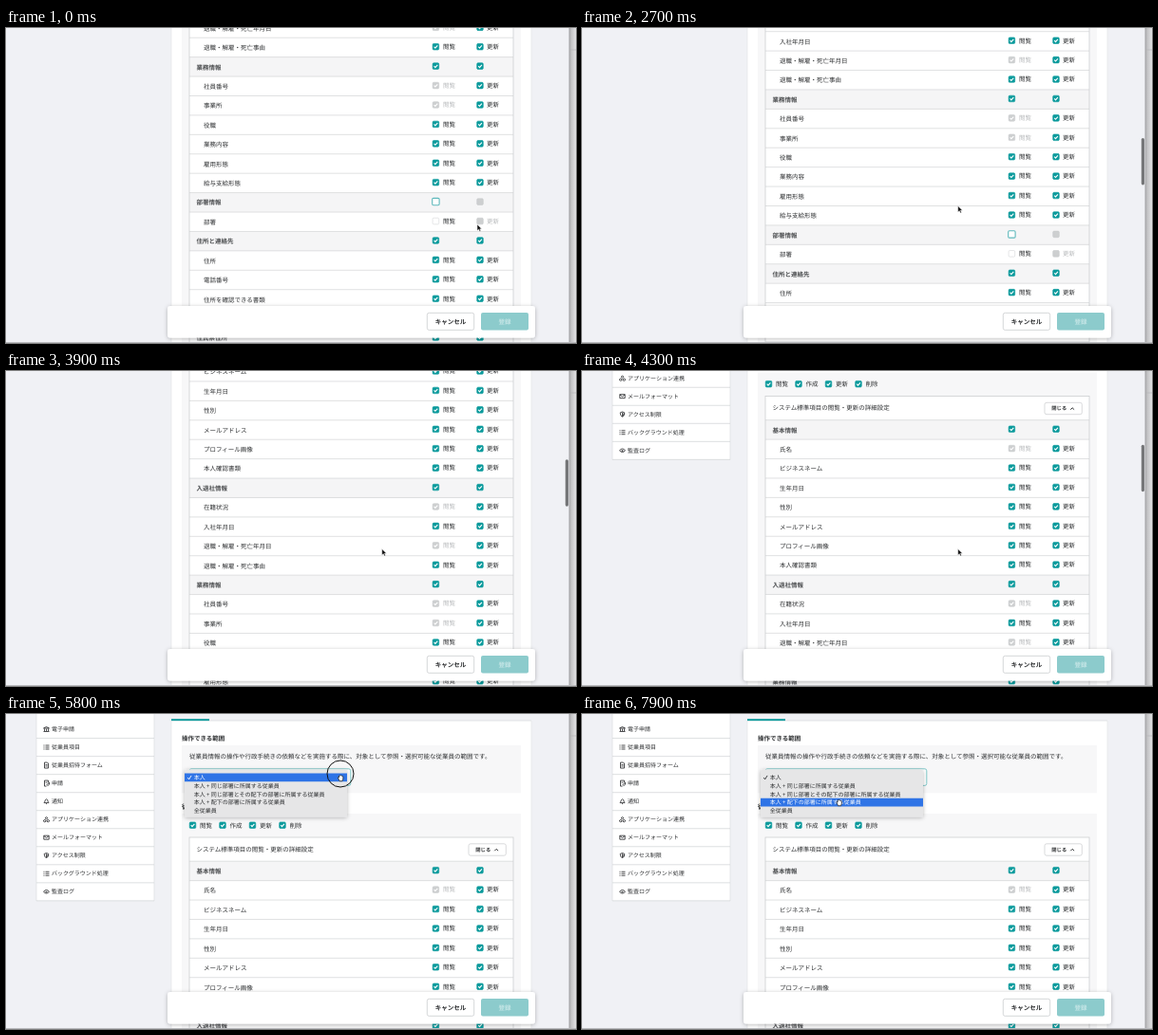
An HTML page for the animation above (8000 ms loop, 600x332 px).

```html
<!DOCTYPE html>
<html lang="ja">
<head>
<meta charset="utf-8">
<style>
html, body { margin: 0; width: 100%; height: 100%; overflow: hidden; background: #f0f1f5; }
svg { display: block; width: 600px; height: 332px; }
text { font-family: "Noto Sans CJK JP", "Noto Sans CJK", "Noto Sans", sans-serif; text-rendering: geometricPrecision; white-space: pre; }
</style>
</head>
<body>
<svg viewBox="0 0 600 332">
  <defs>
    <filter id="soft" x="-10%" y="-40%" width="120%" height="190%">
      <feDropShadow dx="0" dy="1" stdDeviation="2.2" flood-opacity=".28"/>
    </filter>
    <linearGradient id="edge">
      <stop offset="0" stop-color="#b4b4b6"/><stop offset="1" stop-color="#e2e2e4"/>
    </linearGradient>
  </defs>
  <rect width="600" height="332" fill="#f0f1f5"/>
  <g id="page"></g>
  <rect id="thumb" x="588.8" width="3.2" height="49.5" rx="1.6" fill="#757678"/>
  <g id="footer"></g>
  <g id="frame"></g>
  <g id="menu"></g>
  <circle id="ring" cx="352" cy="63" r="14" fill="none" stroke="#111" stroke-width="1"/>
  <path id="arrow" d="M0 0V6.6L1.6 5.2 2.6 7.6 3.8 7.1 2.8 4.8H4.8Z" fill="#111" stroke="#fff" stroke-width=".5"/>
  <path id="hand" d="M-2.2 .3Q-3 -.8 -2 -1L-1.4 -.4V-2.6Q-1 -3.4 -.4 -2.6 .3 -3.3 .8 -2.5 1.6 -2.9 1.9 -2 2.8 -2.2 2.8 -1.2V.8L2.1 3.2H-1Z" fill="#fff" stroke="#222" stroke-width=".75"/>
</svg>
<script>
const $ = id => document.getElementById(id);
const TEAL = '#0b9a9c', INK = '#2d2f31', PITCH = 20.42, TOP = 155.2;

const rect = (x, y, w, h, fill, more = '') =>
  `<rect x="${x}" y="${y}" width="${w}" height="${h}" fill="${fill}" ${more}/>`;
const line = (d, stroke, width = .7) =>
  `<path d="${d}" fill="none" stroke="${stroke}" stroke-width="${width}"/>`;
const text = (x, y, s, size = 6.5, fill = INK, weight = 500, more = '') =>
  `<text x="${x}" y="${y + size * .36}" font-size="${size}" fill="${fill}" font-weight="${weight}" ${more}>${s}</text>`;
const mid = 'text-anchor="middle"';

// Checkbox centred on x, y
function box(x, y, kind = 'on') {
  const [fill, border] = {
    on: [TEAL, TEAL], locked: ['#cdcfd0', '#cdcfd0'], off: ['#fff', '#d4d6d7'],
    focus: ['#fff', '#5fb9bc'], blank: ['#cdcfd0', '#c8cacb']
  }[kind];
  const r = kind === 'focus' ? 3.7 : 3.3;
  const tick = kind === 'on' || kind === 'locked';
  return rect(x - r, y - r, r * 2, r * 2, fill, `rx="1.2" stroke="${border}" stroke-width="${kind === 'focus' ? 1.1 : .6}"`) +
    (tick ? line(`M${x - 1.8} ${y}l1.3 1.4 2.4-2.7`, '#fff', 1.1) : '');
}

// '#' marks a group heading, '-' a locked view permission, '!' an unchecked row
const rows = ['#基本情報', '-氏名', 'ビジネスネーム', '生年月日', '性別', 'メールアドレス', 'プロフィール画像',
  '本人確認書類', '#入退社情報', '-在籍状況', '入社年月日', '-退職・解雇・死亡年月日', '退職・解雇・死亡事由',
  '#業務情報', '-社員番号', '-事業所', '役職', '業務内容', '雇用形態', '給与支給形態', '#!部署情報', '!部署',
  '#住所と連絡先', '住所', '電話番号', '住所を確認できる書類', '緊急連絡先', '#住民票住所', '住所'];

function row(label, i) {
  const y = TOP + PITCH * i, c = y + PITCH / 2, cy = c - .7;
  const group = label.includes('#'), off = label.includes('!'), locked = label.includes('-');
  const view = off ? (group ? 'focus' : 'off') : locked ? 'locked' : 'on';
  return (group ? rect(193, y, 341, PITCH, '#f5f5f6') : '') +
    line(`M193 ${y}H534`, '#d3d4d6') +
    text(group ? 200.5 : 208, c + .3, label.replace(/[#!-]/g, ''), 6.5, group ? '#4c4e50' : INK, group ? 700 : 500) +
    box(452.4, cy, view) + box(499, cy, off ? 'blank' : 'on') +
    (group ? '' : text(460, cy, '閲覧', 6.5, locked ? '#b9bbbd' : INK) +
      text(506, cy, '更新', 6.5, off ? '#b9bbbd' : INK));
}

// Side menu: label and a small icon path in a 6 by 6 box
const list = 'M0 1H1M2 1H6M0 3H1M2 3H6M0 5H1M2 5H6';
const links = [
  ['電子申請', 'M0 2L3 .5 6 2ZM1 2.5V5M3 2.5V5M5 2.5V5M0 5.5H6'],
  ['従業員項目', list],
  ['従業員招待フォーム', 'M1 0H4L5 1V6H1ZM2 2.5H4M2 4H4'],
  ['申請', 'M1 0H5V2M1 0V6H3M2 2H4M3 5L6 2V4L4 6'],
  ['通知', 'M.5 4.5L1.5 3V2Q3-.8 4.5 2V3L5.5 4.5ZM2.5 5.5H3.5'],
  ['アプリケーション連携', 'M2 1L3 .5 4 1V2L3 2.5 2 2ZM0 4L1.3 3.3 2.5 4V5L1.3 5.7 0 5ZM3.5 4L4.7 3.3 6 4V5L4.7 5.7 3.5 5Z'],
  ['メールフォーマット', 'M.3 1H5.7V5H.3ZM.3 1.3L3 3.3 5.7 1.3'],
  ['アクセス制限', 'M3 .3L5.3 1.2Q5.3 4.5 3 5.7 .7 4.5 .7 1.2ZM3 1V5L4.4 3.4V1.8'],
  ['バックグラウンド処理', list],
  ['監査ログ', 'M0 3Q3-.6 6 3 3 6.6 0 3ZM2.4 3H3.6V3.6H2.4Z']
];
const side = links.map(([label, icon], i) => {
  const y = 16 + 19.03 * i;
  return line(`M32 ${y + 9.6}H156`, '#cfd1d4') +
    `<g transform="translate(39.5 ${y - 3})">${line(icon, INK, .85)}</g>` + text(48, y, label, 6);
}).join('');

const tableEnd = TOP + PITCH * rows.length;
$('page').innerHTML =
  rect(32, -60, 124, 256.9, '#fff') + line('M32 -60V197M156 -60V197', '#dcdee1') + side +
  rect(174, 7, 379, 800, '#fff') + line('M174 7H553', '#d5d7da') + line('M174 7V800M553 7V800', '#e4e5e9') +
  rect(174, 5.2, 40, 1.9, TEAL) +
  text(178, -3, '基本設定', 6.5, TEAL, 700) + text(224, -3, 'メンバー管理・手続き・通知設定・書類・その他の項目', 6.5, '#55585a') +
  text(185, 25.6, '操作できる範囲', 6.5, INK, 700) +
  rect(185, 33, 357, 50.3, '#f7f7f8') +
  text(193, 44.8, '従業員情報の操作や行政手続きの依頼などを実施する際に、対象として参照・選択可能な従業員の範囲です。') +
  rect(193, 57.8, 169.8, 17.6, '#fff', 'id="select" rx="2" stroke-width=".8"') +
  text(196.8, 66.7, '本人') + `<path d="M352.2 66L354 63.6 355.8 66ZM352.2 67.4L354 69.8 355.8 67.4Z" fill="${INK}"/>` +
  text(185, 97.6, '従業員情報', 6.5, INK, 700) +
  rect(185, 105, 357, 700, '#f7f7f8') +
  ['閲覧', '作成', '更新', '削除'].map((s, i) =>
    box(196.5 + 31.5 * i, 117.2) + text(204 + 31.5 * i, 117.2, s)).join('') +
  rect(193, 130, 341, tableEnd - 130, '#fff') +
  text(200.5, 142.6, 'システム標準項目の閲覧・更新の詳細設定') +
  rect(487, 136.8, 39.3, 12.4, '#fff', 'rx="2" stroke="#c9cbcd" stroke-width=".7"') +
  text(494.3, 143, '閉じる', 5.3, INK, 700) + line('M514.3 144.2L516.2 142.3 518.1 144.2', INK, 1) +
  rows.map(row).join('') + rect(193, 130, 341, tableEnd - 130, 'none', 'stroke="#cdcfd1" stroke-width=".8"');

$('footer').innerHTML =
  rect(170, 293, 387, 33.6, '#fff', 'rx="3" filter="url(#soft)"') +
  rect(443.3, 300.3, 49.4, 18, '#fff', 'rx="2" stroke="#cbcdcf" stroke-width=".8"') +
  text(468, 309.3, 'キャンセル', 6.5, INK, 700, mid) +
  rect(500, 300, 50, 18.6, '#8ccbcc', 'rx="2"') + text(525, 309.3, '登録', 6.5, '#c6e6e6', 700, mid);

$('frame').innerHTML = rect(593, 0, 7, 332, 'url(#edge)') + line('M593 0V332', '#9a9b9d', .8) +
  line('M594 23H600', '#b5b6b8') + rect(0, 331, 600, 1, '#b9babd');

const choices = ['本人', '本人 + 同じ部署に所属する従業員', '本人 + 同じ部署とその配下の部署に所属する従業員',
  '本人 + 配下の部署に所属する従業員', '全従業員'];
const ITEM = 8.75;
$('menu').innerHTML = rect(188, 58.4, 171, 50, '#e6e6e7', 'rx="2" filter="url(#soft)"') +
  rect(188, 0, 171, ITEM, '#2f74e6', 'id="mark"') +
  choices.map((s, i) => text(197.7, 67 + ITEM * i, s, 6, INK, 500, 'class="choice"')).join('') +
  '<path id="tick" d="M191.3 67l1.3 1.9 2.5-4" fill="none" stroke-width=".9"/>';
const labels = document.querySelectorAll('.choice');

// Keys are [time, value, value...]; linear between them
function track(keys, t) {
  const n = keys.findIndex(k => k[0] > t);
  if (n === 0) return keys[0].slice(1);
  if (n < 0) return keys[keys.length - 1].slice(1);
  const a = keys[n - 1], b = keys[n], p = (t - a[0]) / (b[0] - a[0]);
  return a.slice(1).map((v, i) => v + (b[i + 1] - v) * p);
}
const scrollKeys = [[2400, 390], [2550, 379], [2700, 355.7], [2900, 342], [3200, 335.5], [3500, 334.2], [3600, 319],
  [3800, 241], [4000, 170], [4300, 103.5], [4500, 61], [4700, 26.5], [4900, 7], [5100, 0]];
const pointKeys = [[0, 496, 207], [500, 491, 205], [1000, 498, 203], [1500, 494, 208], [1900, 496, 207],
  [2300, 395.7, 187.5], [4800, 395.7, 187.5], [5400, 352, 67.5], [5900, 352, 67.5], [6300, 305, 84],
  [6700, 280, 86], [7200, 268, 91], [7900, 270.5, 93.5]];

function draw(t) {
  const [scroll] = track(scrollKeys, t), [x, y] = track(pointKeys, t);
  const open = t >= 5600, hand = t >= 5300;
  $('page').setAttribute('transform', `translate(0 ${-scroll})`);
  $('thumb').setAttribute('y', 62 + scroll / 6.6);
  $('thumb').setAttribute('opacity', track([[2200, 0], [2400, 1], [5500, 1], [5750, 0]], t)[0]);
  $('select').setAttribute('stroke', open ? '#5fb9bc' : '#c9cbcd');
  $('menu').style.display = open ? '' : 'none';
  const pick = Math.max(0, Math.min(4, Math.floor((y - 62.5) / ITEM)));
  $('mark').setAttribute('y', 62.5 + ITEM * pick);
  labels.forEach((el, i) => el.setAttribute('fill', i === pick ? '#fff' : INK));
  $('tick').setAttribute('stroke', pick ? INK : '#fff');
  $('ring').setAttribute('opacity', t < 5500 ? 0 : track([[5850, 1], [6050, 0]], t)[0]);
  for (const id of ['arrow', 'hand']) {
    $(id).setAttribute('transform', `translate(${x} ${y})`);
    $(id).style.display = (id === 'hand') === hand ? '' : 'none';
  }
}

const start = performance.now();
function tick(now) {
  draw(Math.floor(Math.max(0, now - start) % 8000 / 100) * 100);
  requestAnimationFrame(tick);
}
tick(start);
</script>
</body>
</html>
```
